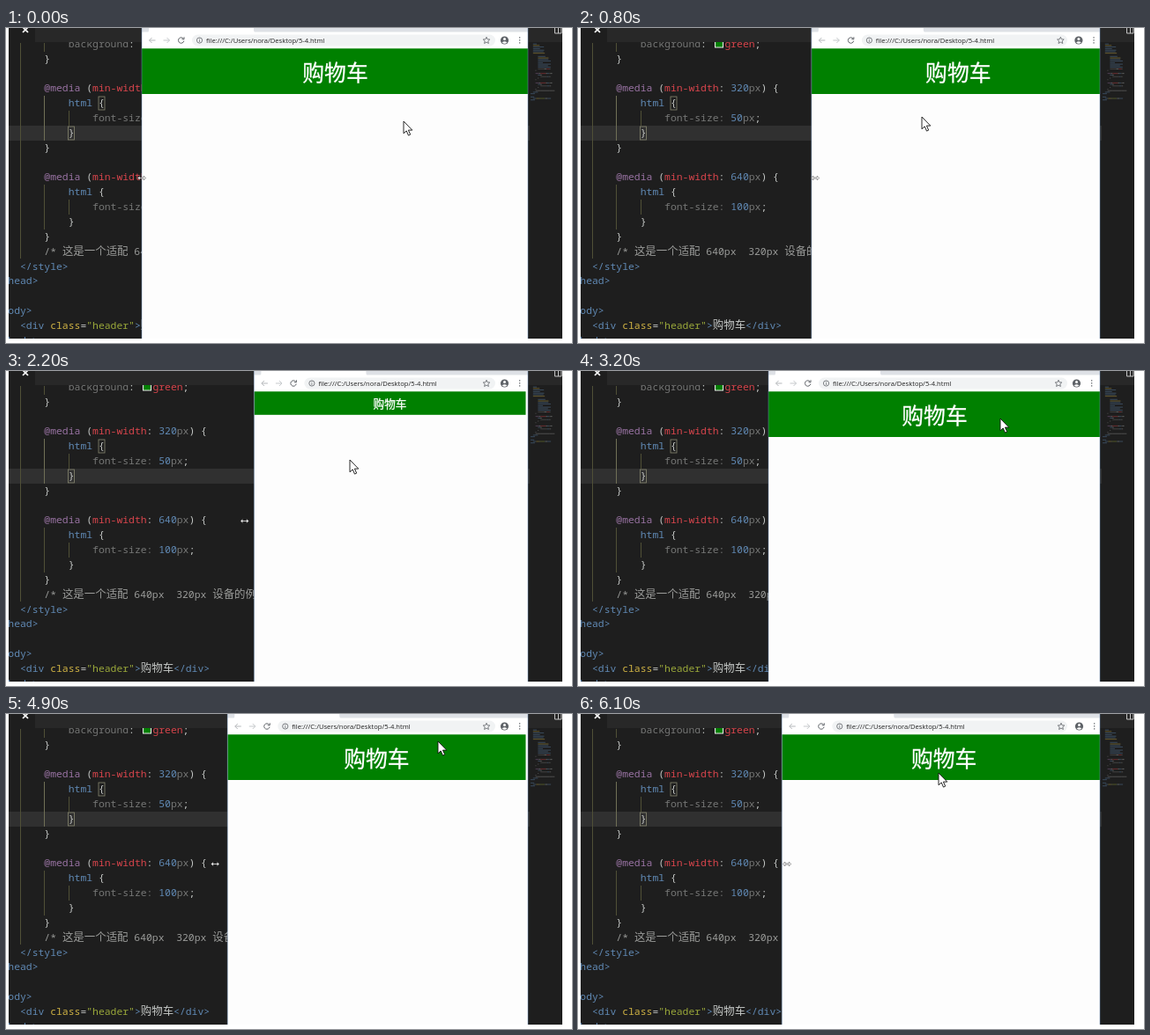
An HTML page for the animation above (6.2 s loop, 642x358 px).

```html
<!DOCTYPE html>
<html lang="zh">
<head>
<meta charset="utf-8">
<title>rem header demo</title>
<style>
  html, body { margin: 0; width: 100%; height: 100%; overflow: hidden; background: #fff; }
  svg { display: block; width: 100%; height: 100%; }
  text { white-space: pre; }
  .code { font: 11.4px "Noto Sans Mono", "DejaVu Sans Mono", monospace; }
  .cjk { font: 12.45px "Noto Sans CJK SC", "Noto Sans CJK", sans-serif; }
  .url { font: 7.6px "Open Sans", "Noto Sans", sans-serif; fill: #222; }
  .title { font-family: "Noto Sans CJK SC", "Noto Sans CJK", sans-serif; fill: #fff;
    stroke: #fff; stroke-width: .3; text-anchor: middle; }
</style>
</head>
<body>
<svg viewBox="0 0 642 358">
  <defs>
    <clipPath id="screen"><rect x="3" width="628" height="353"/></clipPath>
    <clipPath id="frame"><rect id="frameBox" y="0" height="353"/></clipPath>
  </defs>
  <g clip-path="url(#screen)">
    <rect width="642" height="358" fill="#1e1e1e"/>
    <rect x="3" y="111" width="591" height="17" fill="#303030"/>
    <g fill="none" stroke="#505037">
      <path d="M16.5 17V262M43.5 17V27M43.5 178V229M71.5 94V111M71.5 195V212"/>
      <path d="M43.5 77V128" stroke="#707057"/>
    </g>
    <g id="code" class="code"></g>
    <g fill="none" stroke="#888870" stroke-width=".8">
      <rect x="105" y="78" width="7" height="15"/>
      <rect x="70.5" y="112" width="7" height="15"/>
    </g>
    <rect x="155.5" y="13" width="9" height="9" fill="#008000" stroke="#eee"/>
    <rect width="642" height="16" fill="#282828"/>
    <rect x="3" width="30" height="16" fill="#1e1e1e"/>
    <path d="M19-1l6 6m0-6l-6 6" stroke="#fff" stroke-width="1.7"/>
    <g id="minimap" opacity=".5"></g>
    <path d="M622.5-2h7.5v8h-7.500zM626.5-2v8" fill="none" stroke="#c5c5c5"/>

    <g clip-path="url(#frame)">
      <rect width="642" height="358" fill="#fdfdfd"/>
      <rect width="642" height="5" fill="#dee1e6"/>
      <path id="tab" d="M5 6q3 0 3-4v-2h119v2q0 3 3 4z" fill="#fff"/>
      <rect y="4.5" width="642" height="19" fill="#fff"/>
      <rect id="pill" y="7.5" height="13" rx="6.5" fill="#f1f3f4"/>
      <g id="tools" fill="none" stroke="#5f6368">
        <path d="M15.5 14h-7m3-3l-3 3 3 3" stroke="#b5b8bb"/>
        <path d="M24.5 14h7m-3-3l3 3-3 3" stroke="#c5c8cb"/>
        <path d="M47.3 12.2a3.2 3.2 0 1 0 .5 2.500M48 10.300v2.500h-2.500"/>
        <circle cx="65.5" cy="14" r="3.1" stroke-width=".8"/>
        <path d="M65.5 13.5v2.300m0-4v.8" stroke-width=".8"/>
        <text class="url" x="73" y="16.8" stroke="none">file:///C:/Users/nora/Desktop/5-4.html</text>
      </g>
      <g id="right" fill="#5f6368">
        <path d="M545 10.300l1.100 2.500 2.700.2-2 1.800.6 2.700-2.400-1.400-2.400 1.400.6-2.700-2-1.800 2.700-.2z" fill="none" stroke="#5f6368" stroke-width=".8"/>
        <circle cx="565.5" cy="14" r="4.6"/>
        <circle cx="565.5" cy="12.5" r="1.5" fill="#fff"/>
        <path d="M562.7 16.5q2.8-2.400 5.600 0-2.800 2.400-5.600 0z" fill="#fff"/>
        <path d="M582 10.300h1.300v1.300h-1.300zm0 3h1.300v1.300h-1.300zm0 3h1.300v1.300h-1.300z"/>
      </g>
      <rect id="header" y="23.3" fill="#008000"/>
      <text id="title" class="title">购物车</text>
    </g>
    <path id="borders" stroke="#6f8fb5" stroke-width=".5"/>
    <path id="resize" d="M-4.700 0l2.500-2.300v1.700h4.400v-1.700l2.500 2.300-2.500 2.300v-1.700h-4.400v1.700z" fill="#fff" stroke="#444" stroke-width=".5"/>
    <path id="arrow" d="M0 0v13.800l3.200-2.900 2.300 5.200 2.200-1-2.300-5h4.400z" fill="#fff" stroke="#111" stroke-width=".9"/>
  </g>
</svg>
<script>
const LOOP = 6200, STEP = 100, RIGHT = 592;
const NS = "http://www.w3.org/2000/svg";
const $ = id => document.getElementById(id);

function set(el, attrs) {
  for (const k in attrs) el.setAttribute(k, attrs[k]);
}
function add(parent, tag, attrs, content = "") {
  const el = document.createElementNS(NS, tag);
  set(el, attrs);
  el.textContent = content;
  return parent.appendChild(el);
}

// ---- editor ----
const C = {
  plain: "#c5c8c6", key: "#9872a2", feature: "#d8454c", num: "#6089b4",
  prop: "#767776", note: "#9a9b99", attr: "#d0b344", str: "#9aa83a"
};
const LINE = 16.85, TAB = 27.36;

// one tiny run of the overview, col and len in characters
function mini(row, col, len, color) {
  add($("minimap"), "rect", {
    x: 595 + col * .7, y: 46 + row * 1.77, width: len * .7, height: .8, fill: C[color]
  });
}

// rows count from the first visible line, level is the indent depth
function line(row, level, ...runs) {
  const text = add($("code"), "text", { x: 16 + level * TAB, y: 21.8 + row * LINE });
  let col = (level + 1) * 4;
  for (const [color, str, cls] of runs) {
    add(text, "tspan", { fill: C[color], class: cls || "code" }, str);
    mini(row, col, str.length, color);
    col += str.length;
  }
}
function media(row, width, size) {
  line(row, 1, ["key", "@media"], ["plain", " ("], ["feature", "min-width"], ["plain", ": "],
    ["num", width], ["prop", "px"], ["plain", ") {"]);
  line(row + 1, 2, ["num", "html"], ["plain", " {"]);
  line(row + 2, 3, ["prop", "font-size: "], ["num", size], ["prop", "px"], ["plain", ";"]);
  line(row + 3, 2, ["plain", "}"]);
  line(row + 4, 1, ["plain", "}"]);
}

line(0, 2, ["prop", "background"], ["plain", ":   "], ["feature", "green"], ["plain", ";"]);
line(1, 1, ["plain", "}"]);
media(3, "320", "50");
media(9, "640", "100");
line(14, 1, ["note", "/* "], ["note", "这是一个适配", "cjk"], ["note", " 640px  320px "],
  ["note", "设备的例子", "cjk"], ["note", " */"]);
line(15, 0, ["num", "</style>"]);
line(16, -1, ["num", "</head>"]);
line(18, -1, ["num", "<body>"]);
line(19, 0, ["num", "<div "], ["attr", "class"], ["plain", "="], ["str", "\"header\""],
  ["num", ">"], ["plain", "购物车", "cjk"], ["num", "</div>"]);
line(20, -1, ["num", "</body>"]);

// scrolled-off lines appear only in the overview
let seed = 7;
const random = () => (seed = seed * 16807 % 2147483647) / 2147483647;
for (let row = -16; row < 0; row++) {
  const col = row < -9 ? 4 : 12;
  if (row !== -9) mini(row, col, 6 + random() * 16, random() < .3 ? "attr" : "num");
}

// ---- motion: each move is [start, end, ...target, ease] and begins where the last one stopped ----
const sine = p => (1 - Math.cos(Math.PI * p)) / 2;
const slowing = p => 1 - (1 - p) ** 1.4;
const linear = p => p;

const edgeMoves = [
  [0, 1500, [323], slowing],
  [1900, 2600, [216], sine],
  [3500, 3750, [156], sine],
  [3750, 4000, [268], sine],
  [4100, 4450, [328], sine],
  [4470, 5400, [154], sine],
  [5500, 6400, [257], sine]
];
const arrowMoves = [
  [0, 200, [390, 101], linear],
  [2500, 2600, [217, 162], linear],
  [2600, 3000, [614, 18], sine],
  [3000, 3200, [479, 54], linear],
  [3400, 3500, [598, 40], linear],
  [3500, 3600, [490, 31], linear],
  [5500, 5600, [156, 175], linear],
  [5600, 5900, [409, 67], linear]
];

const clamp = (v, lo, hi) => Math.max(lo, Math.min(hi, v));

function follow(moves, from, t) {
  return moves.reduce((pos, [start, end, to, ease]) => {
    const p = ease(clamp((t - start) / (end - start), 0, 1));
    return pos.map((v, i) => v + (to[i] - v) * p);
  }, from);
}
const edgeAt = t => follow(edgeMoves, [154], t)[0];

function draw(t) {
  const edge = edgeAt(t);
  const speed = edge - edgeAt(t - STEP);
  // page layout trails the dragged edge
  const lag = clamp(speed * .4, -3.5, 6);
  const right = RIGHT + 1 + lag;
  const small = edge > 273;

  set($("frameBox"), { x: edge, width: RIGHT - edge });
  for (const id of ["tab", "tools"]) set($(id), { transform: `translate(${edge})` });
  set($("right"), { transform: `translate(${Math.max(0, lag) * .5})` });
  set($("pill"), { x: edge + 57, width: 498 - edge });
  set($("header"), { x: edge, width: right - edge, height: small ? 26.5 : 51.7 });
  set($("title"), {
    x: (edge + right) / 2, y: small ? 41.8 : 59.7, "font-size": small ? 12.6 : 24.8
  });
  set($("borders"), { d: `M${edge} 0V353M${RIGHT} 0V353` });

  set($("resize"), {
    transform: `translate(${edge + speed * (speed > 0 ? .35 : .5)} 170.5)`,
    visibility: t >= 2700 && t < 3600 ? "hidden" : "visible"
  });
  set($("arrow"), { transform: `translate(${follow(arrowMoves, [451, 106], t).join(" ")})` });
}

const start = performance.now();
function tick() {
  const t = (performance.now() - start) % LOOP;
  draw(Math.floor(t / STEP) * STEP);
  requestAnimationFrame(tick);
}
tick();
</script>
</body>
</html>
```
